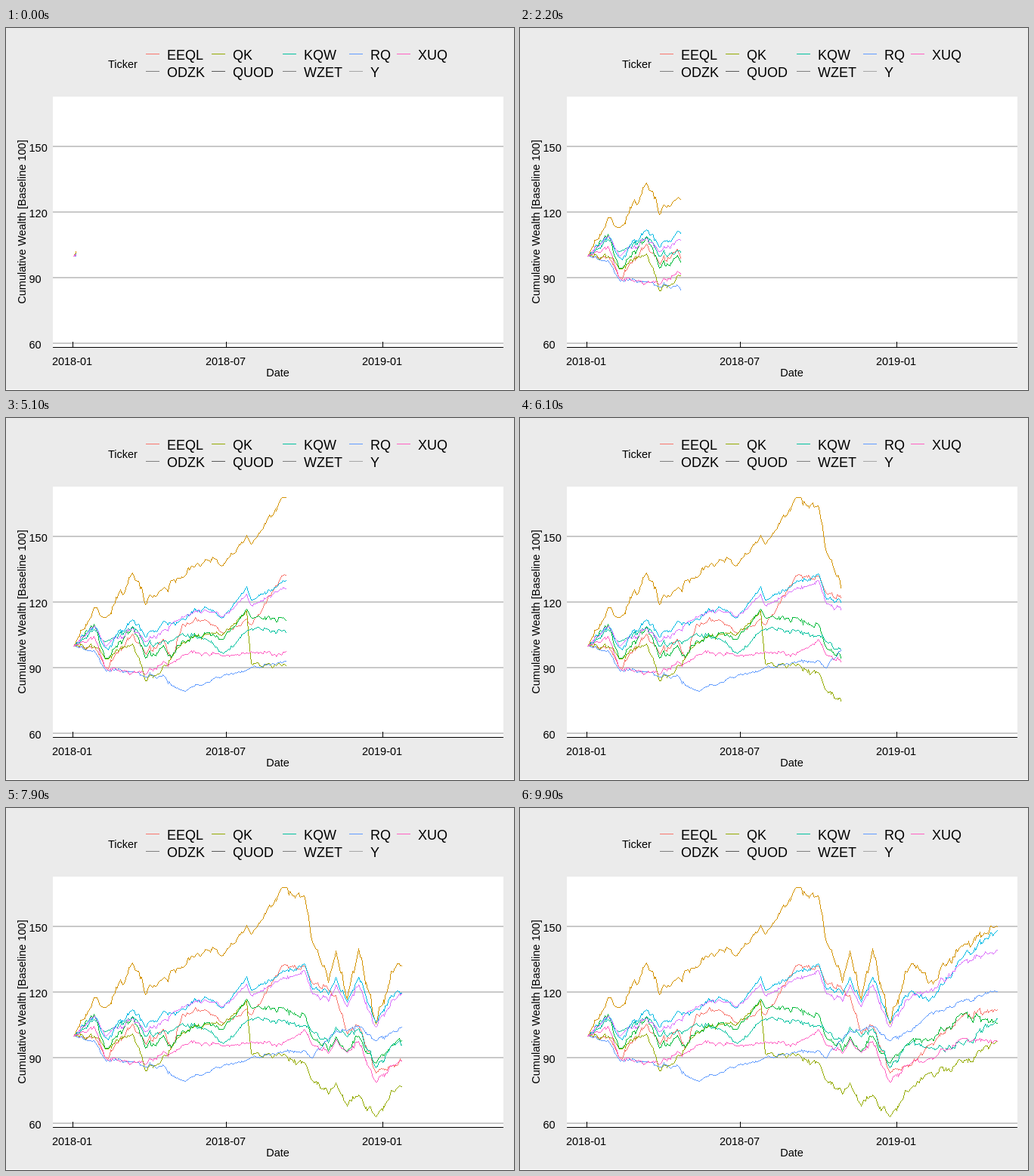
An HTML page with a canvas for the animation above (10 s loop, 672 px wide and 480 px high).

```html
<!DOCTYPE html>
<html lang="en">
<head>
<meta charset="utf-8">
<title>Cumulative wealth</title>
<style>
html, body { margin: 0; width: 100%; height: 100%; overflow: hidden; background: #fff; }
svg, canvas { position: absolute; left: 0; top: 0; width: 672px; height: 480px; }
text { font-family: "Liberation Sans", Arial, sans-serif; font-size: 14.5px; }
.key { font-size: 18px; }
.mid { text-anchor: middle; }
rect { shape-rendering: crispEdges; }
</style>
</head>
<body>
<svg id="chart" viewBox="0 0 672 480">
  <rect width="672" height="479" fill="#ebebeb"/>
  <rect x="62" y="91" width="596" height="333" fill="#fff"/>
  <text x="135" y="53">Ticker</text>
  <text class="mid" x="359.5" y="462">Date</text>
  <text class="mid" transform="translate(26 257) rotate(-90)">Cumulative Wealth [Baseline 100]</text>
</svg>
<canvas id="lines" width="672" height="480"></canvas>
<script>
const svg = document.getElementById('chart');
const ctx = document.getElementById('lines').getContext('2d');

function add(tag, attrs, label) {
  const el = document.createElementNS(svg.namespaceURI, tag);
  for (const k in attrs) el.setAttribute(k, attrs[k]);
  if (label) el.textContent = label;
  svg.appendChild(el);
}
const box = (x, y, width, height, fill) => add('rect', { x, y, width, height, fill });

// Axes
[150, 120, 90, 60].forEach((v, i) => {
  box(62, 156 + 87 * i, 596, 2, '#c9c9c9');
  add('text', { x: 30.5, y: 163.5 + 87 * i }, v);
});
box(62, 423, 596, 1, '#000');
[['2018-01', 88], ['2018-07', 291], ['2019-01', 498]].forEach(([label, x]) => {
  box(x, 416, 1, 7, '#000');
  add('text', { x: x - 0.5, y: 447, class: 'mid' }, label);
});

// Legend, filled column by column
const cols = [185, 272, 366, 454, 517];
const keys = [
  ['EEQL', '#f8766d'], ['ODZK', '#7f7f7f'], ['QK', '#93aa00'],
  ['QUOD', '#595959'], ['KQW', '#00c19f'], ['WZET', '#7f7f7f'],
  ['RQ', '#619cff'], ['Y', '#a6a6a6'], ['XUQ', '#ff61c3']
];
keys.forEach(([label, color], i) => {
  const x = cols[i >> 1], y = 23 * (i % 2);
  box(x, 34 + y, 18, 1, color);
  add('text', { x: x + 28, y: 42 + y, class: 'key' }, label);
});

const LAST = 484;
const px = d => 88.3 + 1.1215 * d;
const py = v => 157 + (150 - v) * 2.9;

// Days on which the whole market turns
const turns = [1, 25, 38, 70, 85, 107, 116, 129, 156, 177, 205, 210,
  246, 273, 282, 301, 310, 323, 337, 357, 382, 403, 444, LAST];

// Noise that drifts back to zero, calmer in summer
function drift(seed, size) {
  let w = 0;
  return Array.from({ length: LAST + 1 }, (_, d) => {
    seed = seed * 16807 % 2147483647;
    const vol = size * (1 - 0.4 * Math.exp(-(((d - 200) / 60) ** 2)));
    return w = 0.6 * w + vol * (seed / 1073741824 - 1);
  });
}
const market = drift(4211, 1);

// Daily path through one value per turning day
function series(color, noise, values) {
  const own = drift(values[5] * 977 | 0, noise);
  const path = [];
  for (let d = 1, j = 0; d <= LAST; d++) {
    if (d % 7 > 4) continue; // weekends
    while (turns[j + 1] < d) j++;
    const a = d - turns[j], b = turns[j + 1] - d;
    const base = (values[j] * b + values[j + 1] * a) / (a + b);
    const fade = Math.min(1, a / 4, b / 4);
    path.push([px(d), py(base + fade * (own[d] + market[d] * noise))]);
  }
  return { color, path };
}

const all = [
  series('#f8766d', 1, [100, 99.6, 90.3, 105.5, 96.5, 103, 94, 110, 112, 106, 112.5, 109.5,
    132, 132, 124, 121, 118.5, 101, 105, 83, 86.5, 96, 109.5, 112]),
  series('#d39200', 1.3, [100, 117.6, 113, 133.5, 119, 126.5, 130, 131.5, 139.5, 137, 150.6, 146.4,
    167.5, 164, 143, 124.5, 139, 117, 140, 105.5, 133, 124, 141.6, 150]),
  series('#93aa00', 1, [100, 100, 94.3, 101, 84, 91, 94.5, 101.5, 105.5, 105.5, 116.3, 92,
    91, 88, 79.5, 73.5, 78.5, 68, 73, 63.2, 76.3, 83, 88, 97.5]),
  series('#00ba38', 1, [100, 110, 94, 109, 94.5, 100.3, 95, 102.5, 106, 103, 117, 113,
    113, 110, 99, 93, 99.5, 93, 100, 87.5, 98, 98, 110, 106]),
  series('#00c19f', 0.9, [100, 107.7, 102, 109, 100, 102.5, 102.5, 106, 103.3, 96.5, 107, 108,
    107, 105, 102, 97, 104, 99.5, 103.5, 85.5, 97, 94.5, 96, 108]),
  series('#00b9e3', 0.9, [100, 109.4, 99.3, 112, 104, 111.5, 110.5, 112.5, 118, 113, 127.3, 121,
    129, 133, 121.5, 119, 127, 115.5, 127, 106.3, 120.8, 116, 136.5, 148.3]),
  series('#619cff', 0.6, [100, 98, 89, 88.3, 86, 86.7, 82, 79.7, 83, 86.5, 89, 90.5,
    92.5, 93.5, 90, 98.5, 102.5, 102.5, 104.5, 98, 102, 110, 116, 120.5]),
  series('#db72fb', 0.8, [100, 109.4, 100, 108.3, 102, 107.3, 110, 113.5, 116.5, 113.5, 123.7, 118.5,
    126, 130, 119.3, 115.7, 123.5, 113.5, 123.5, 104, 118, 120, 134, 139.3]),
  series('#ff61c3', 0.7, [100, 104.5, 90, 88, 87, 93, 92, 96, 97, 95.5, 97, 97.5,
    96, 103, 96, 92, 98.5, 92.3, 97.5, 78.8, 87.7, 89.5, 99, 97.5])
];

// One-pixel line without smoothing
function segment(x0, y0, x1, y1) {
  x0 = Math.round(x0); y0 = Math.round(y0);
  const dx = Math.round(x1) - x0, dy = Math.round(y1) - y0;
  const n = Math.max(Math.abs(dx), Math.abs(dy), 1);
  for (let i = 0; i <= n; i++) {
    ctx.fillRect(Math.round(x0 + dx * i / n), Math.round(y0 + dy * i / n), 1, 1);
  }
}

function draw(step) {
  const end = Math.min(92 + 5.45 * step, px(LAST));
  ctx.clearRect(0, 0, 672, 480);
  for (const { color, path } of all) {
    ctx.fillStyle = color;
    for (let i = 1; i < path.length; i++) {
      const [x0, y0] = path[i - 1], [x1, y1] = path[i];
      if (x0 >= end) break;
      const f = Math.min(1, (end - x0) / (x1 - x0));
      segment(x0, y0, x0 + (x1 - x0) * f, y0 + (y1 - y0) * f);
    }
  }
}

let shown = -1;
const start = performance.now();
function tick() {
  const step = Math.floor((performance.now() - start) / 100) % 100;
  if (step !== shown) draw(shown = step);
  requestAnimationFrame(tick);
}
tick();
</script>
</body>
</html>
```
